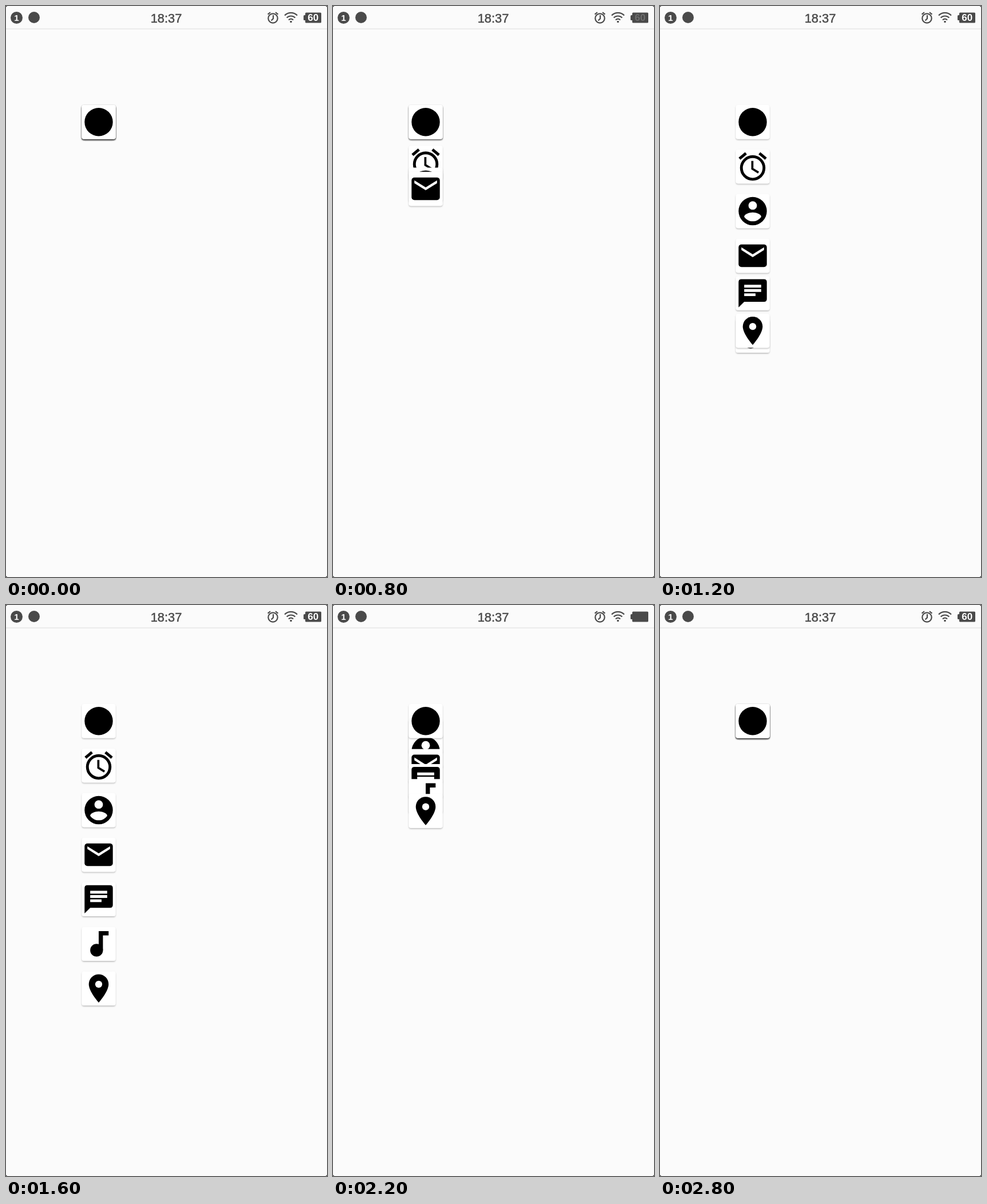
Write an HTML page that moves like this. It is 561 by 998 pixels and loops after 5000 ms.

```html
<!DOCTYPE html>
<html lang="en">
<head>
<meta charset="utf-8">
<title>Expanding icon menu</title>
<style>
html, body { margin: 0; width: 100%; height: 100%; overflow: hidden; background: #000; }
svg { display: block; width: 100vw; height: 100vh; }
text { font-family: "Liberation Sans", Arial, sans-serif; text-anchor: middle; }
.line { fill: none; stroke: #4a4a4a; stroke-width: 2.2; }
.ink { fill: none; stroke: #000; stroke-width: 2; }
.gap { fill: none; stroke: #fff; stroke-width: 2; }
</style>
</head>
<body>
<svg viewBox="0 0 561 998">
  <defs>
    <filter id="shadow" x="-20%" y="-20%" width="140%" height="140%">
      <feDropShadow dx="0" dy="1.5" stdDeviation=".8" flood-color="#000" flood-opacity=".27"/>
    </filter>
  </defs>
  <rect width="561" height="998" rx="3" fill="#fbfbfb"/>
  <path d="M0 40H561" stroke="#e6e6e6" stroke-width="1.4"/>

  <!-- status bar -->
  <g fill="#4a4a4a">
    <circle cx="18.5" cy="20.5" r="10.5"/>
    <text x="18.3" y="26" font-size="15" font-weight="bold" fill="#fff">1</text>
    <circle cx="49" cy="20" r="10"/>
    <text x="280" y="29" font-size="21.8" stroke="#4a4a4a" stroke-width=".5">18:37</text>
    <g class="line">
      <circle cx="466.5" cy="21.5" r="8.2"/>
      <path d="M467 16V22L463.5 25.5M457.6 14.6L462 11M475.4 14.6L471 11"/>
      <path d="M487 16.5A15.5 15.5 0 0 1 509 16.5M490.6 20.6A10.4 10.4 0 0 1 505.4 20.6M494 24.4A5.6 5.6 0 0 1 502 24.4"/>
    </g>
    <circle cx="498" cy="27.5" r="1.8"/>
    <rect x="523" y="11.5" width="28" height="18" rx="1.5"/>
    <rect x="520" y="16" width="5" height="9" rx="1.5"/>
    <text id="level" x="536.7" y="26.3" font-size="17" font-weight="bold" fill="#fff">60</text>
  </g>
  <g id="menu"></g>
</svg>
<script>
const LOOP = 5000, STEP = 100;          // the screen refreshes ten times a second
const LEFT = 162, TOP = 202.7, PITCH = 77.93, SCALE = 2.47;

// Icons on a 24-unit grid, centred on (12, 12); the first is the menu button.
const icons = [
  '<circle cx="12" cy="12" r="10"/>',
  '<circle class="ink" cx="12" cy="13" r="8"/>' +
    '<path class="ink" d="M2.65 6.47L7.25 2.62M21.35 6.47L16.75 2.62"/>' +
    '<path class="ink" stroke-width="1.5" style="stroke-width:1.5" d="M11.75 8V13.6L16.1 16.25"/>',
  '<circle cx="12" cy="12" r="10"/><g fill="#fff"><circle cx="12" cy="8" r="3"/>' +
    '<path d="M6 15.98C6.03 13.99 10 12.9 12 12.9S17.97 13.99 18 15.98C16.7 17.9 14.5 19.2 12 19.2S7.3 17.9 6 15.98"/></g>',
  '<rect x="2" y="4" width="20" height="16" rx="2"/><path fill="#fff" d="M4 6L12 11L20 6V8L12 13L4 8Z"/>',
  '<path d="M4 2H20Q22 2 22 4V16Q22 18 20 18H6L2 22V4Q2 2 4 2"/><path class="gap" d="M6 7H18M6 10H18M6 13H14"/>',
  '<circle cx="10.5" cy="16.5" r="4.5"/><path d="M12 3H19V6H15V16.5H12Z"/>',
  '<path d="M12 2C8.13 2 5 5.13 5 9C5 14.25 12 22 12 22S19 14.25 19 9C19 5.13 15.87 2 12 2"/>' +
    '<circle cx="12" cy="9" r="2.5" fill="#fff"/>'
];

const menu = document.getElementById('menu');
const level = document.getElementById('level');
const cards = icons.map(icon => {
  const g = document.createElementNS('http://www.w3.org/2000/svg', 'g');
  g.innerHTML = '<rect x="-29.5" y="-29.7" width="59" height="59.4" rx="4" fill="#fff" filter="url(#shadow)"/>' +
    `<g transform="scale(${SCALE}) translate(-12 -12)">${icon}</g>`;
  return g;
});
menu.append(...cards.slice(1), cards[0]);

const clamp = x => Math.min(1, Math.max(0, x));

// Falls to 1, then rebounds three times.
function bounce(x) {
  const u = x * 1.1226, arc = (mid, low) => 8 * (u - mid) ** 2 + low;
  if (u < .3535) return arc(0, 0);
  if (u < .7408) return arc(.54719, .7);
  if (u < .9644) return arc(.8526, .9);
  return Math.min(1, arc(1.0435, .95));
}

// Cards drop one after another and fold back together.
const open = (i, t) => bounce(clamp((t - 487.6 - 108 * (i - 1)) / 433));
function folded(t) {
  const u = 1 - (1 - clamp((t - 1891) / 620)) ** 1.35;
  return (1 - Math.cos(Math.PI * u)) / 2;
}

// The battery level fades out and back around each given moment.
const dip = (t, mid) => Math.sin(Math.PI / 2 * clamp(Math.abs(t - mid) / 380)) ** 2;

function draw(now) {
  const t = Math.floor(now % LOOP / STEP) * STEP;
  cards.forEach((card, i) => {
    const y = i && i * PITCH * open(i, t) * (1 - folded(t));
    card.setAttribute('transform', `translate(${LEFT} ${TOP + y})`);
  });
  level.setAttribute('opacity', dip(t, 690) * dip(t, 2190));
  requestAnimationFrame(draw);
}
draw(0);
</script>
</body>
</html>
```
